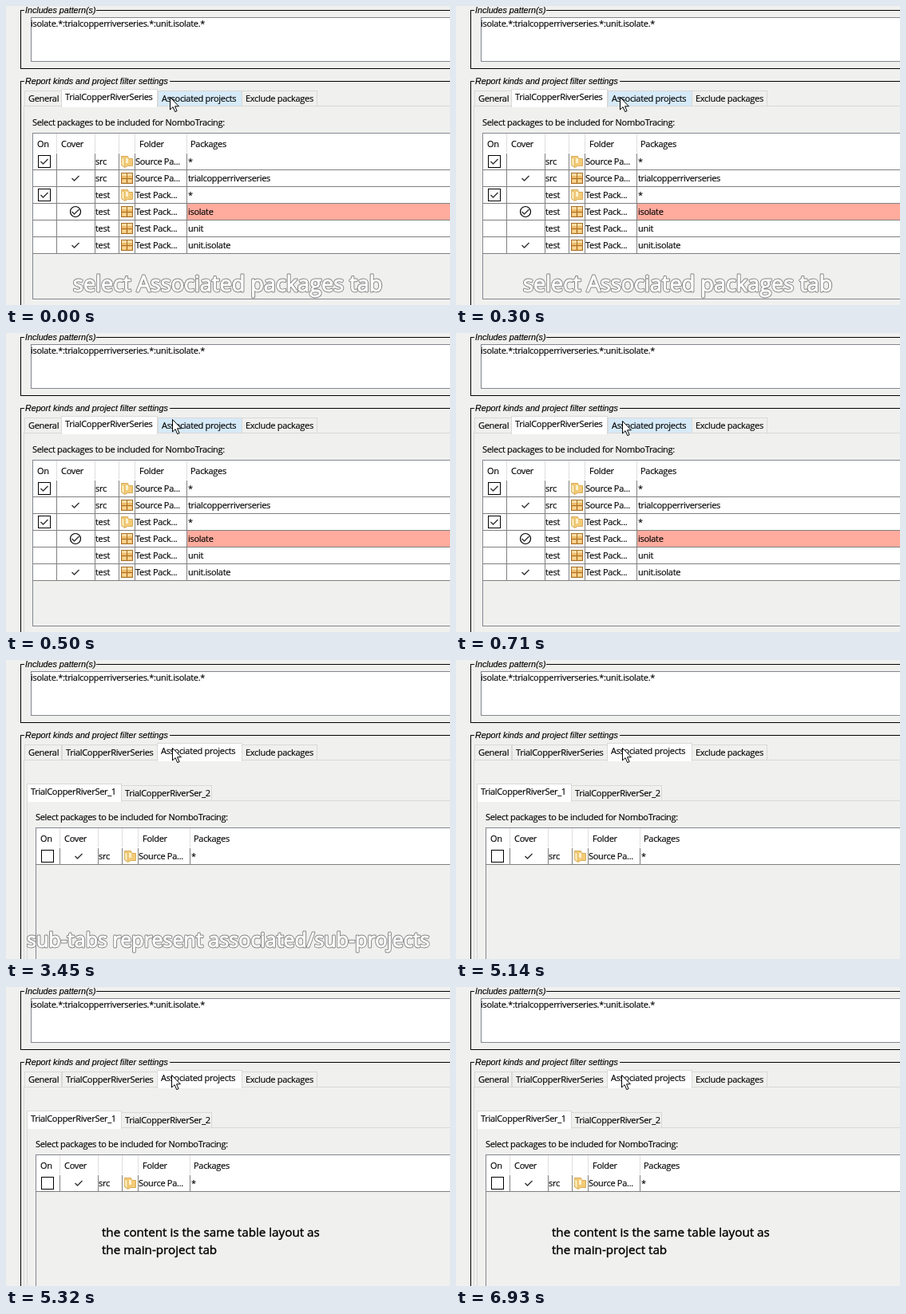
Recreate the animation shown at these times as an HTML page. Size 556x375 px, loop 8 s.

```html
<!DOCTYPE html>
<html lang="en">
<head>
<meta charset="utf-8">
<title>Associated projects tab</title>
<style>
html, body { margin: 0; width: 100%; height: 100%; overflow: hidden; background: #f0f0ee; }
svg { display: block; }
text { font: 11px "Open Sans", "Noto Sans", sans-serif; letter-spacing: -.3px; fill: #000;
  stroke: #000; stroke-width: .15px; }
.legend { font: italic 10.7px "Liberation Sans", Arial, sans-serif; letter-spacing: 0; }
.caption, .outline { letter-spacing: 0; fill: #fff; stroke: #fff; stroke-width: .9px; stroke-linejoin: round; }
.outline { stroke: #858585; stroke-width: 2.8px; }
.note { font-size: 15.2px; letter-spacing: 0; stroke-width: .4px; }
</style>
</head>
<body>
<svg id="stage" width="556" height="375" viewBox="0 0 556 375"></svg>
<script>
const BG = '#f0f0ee', EDGE = '#828790', GRID = '#808080', PALE = '#d9d9d9';
const PROJECT = 'TrialCopperRiverSeries', SUB = 'TrialCopperRiverSer_';

const box = (x, y, w, h, fill) =>
  `<rect x="${x}" y="${y}" width="${w}" height="${h}" fill="${fill}"/>`;
const frame = (x, y, w, h, fill, edge) =>
  box(x, y, w, h, edge) + box(x + 1, y + 1, w - 2, h - 2, fill);
const text = (x, y, s, cls = '', size = '') =>
  `<text x="${x}" y="${y}" class="${cls}"${size && ` style="font-size:${size}px"`}>${s}</text>`;
const caption = (x, y, s, size) => text(x, y, s, 'outline', size) + text(x, y, s, 'caption', size);
const path = (d, stroke, width = 1, fill = 'none') =>
  `<path d="${d}" stroke="${stroke}" stroke-width="${width}" fill="${fill}"/>`;
const at = (x, y, s) => `<g transform="translate(${x} ${y})">${s}</g>`;
const group = (id, s) => `<g id="${id}">${s}</g>`;

const tick = (x, y) => path(`M${x - 4.5} ${y}l3 3 6-6`, '#333', 1.4);
const checkbox = (x, y, on) =>
  frame(x, y, 16, 16, '#fff', '#000') + (on ? tick(x + 8, y + 8) : '');

function fieldset(y, h, title, lineStart) {
  return box(18, y, 1, h, '#000') + box(18, y, 5, 1, '#000') +
    box(lineStart, y, 556, 1, '#000') + text(24, y + 4, title, 'legend');
}

function tab(x, y, w, label, selected, fill = BG) {
  return selected
    ? frame(x, y - 2, w, 23, '#fff', PALE) + box(x + 1, y + 18, w - 2, 3, '#fff') + text(x + 5, y + 12, label)
    : frame(x, y, w, 20, fill, PALE) + text(x + 5, y + 14, label);
}

// Panel whose top edge runs under a row of tabs
const panel = (x, y) => box(x, y, 556, 1, PALE) + box(x, y, 1, 375, PALE);

const folderIcon = at(143, 187,
  path('M1.5 1.5h8l1 3h5v9h-6l-4 2-4-3z', '#d9ac57', 1, '#f3cb78') +
  path('M1.5 2.5l4 2v10.5l-4-3z', '#e0b866', 1, '#fbe6b0') +
  box(7, 4, 3, 6, '#fdf0cc'));
const packageIcon = at(144, 187,
  frame(0, 1, 15, 14, '#edbd6c', '#a86f28') + box(1, 2, 13, 3, '#f9dea6') +
  box(7, 1, 1, 14, '#a86f28') + box(0, 8, 15, 1, '#a86f28') +
  box(2, 10, 4, 3, '#f8d797') + box(9, 10, 4, 3, '#f8d797'));

const COLUMNS = [63, 111, 141, 161, 226];

// Row: [on, cover, kind, icon, package]
function row([on, cover, kind, icon, name], i) {
  const marked = cover === 'ring';
  let s = box(34, 185, 522, 20, '#fff') + (marked ? box(227, 185, 329, 20, '#ffab9d') : '') +
    box(33, 205, 523, 1, GRID) + COLUMNS.map(x => box(x, 185, 1, 21, GRID)).join('');
  if (on) s += checkbox(40, 187, on === 'checked');
  if (marked) s += '<circle cx="87" cy="195" r="6.5" fill="#fff" stroke="#000" stroke-width="1.2"/>';
  if (cover) s += tick(87, 195);
  s += text(112, 199, kind) + icon +
    text(162, 199, kind === 'src' ? 'Source Pa...' : 'Test Pack...') + text(228, 199, name);
  return at(0, i * 21, s);
}

function table(rows, height) {
  return text(33, 150, 'Select packages to be included for NomboTracing:') +
    frame(33, 159, 560, height, BG, EDGE) + box(34, 160, 522, 25, '#fff') +
    COLUMNS.map(x => box(x, 160, 1, 24, '#dedede')).join('') +
    text(39, 177, 'On') + text(69, 177, 'Cover') + text(167, 177, 'Folder') + text(231, 177, 'Packages') +
    rows.map(row).join('');
}

const base = box(0, 0, 556, 375, BG) +
  fieldset(5, 74, 'Includes pattern(s)', 113) + box(18, 78, 556, 1, '#000') +
  frame(31, 14, 560, 56, '#fff', EDGE) +
  text(31, 26, `isolate.*:${PROJECT.toLowerCase()}.*:unit.isolate.*`) +
  fieldset(94, 281, 'Report kinds and project filter settings', 205) +
  panel(22, 125) + tab(23, 106, 47, 'General') + tab(295, 106, 95, 'Exclude packages');

const mainTab = tab(190, 106, 106, 'Associated projects', false, '#d6eaf8') +
  tab(69, 106, 121, PROJECT, true) +
  table([
    ['checked', '', 'src', folderIcon, '*'],
    ['', 'tick', 'src', packageIcon, PROJECT.toLowerCase()],
    ['checked', '', 'test', folderIcon, '*'],
    ['', 'ring', 'test', packageIcon, 'isolate'],
    ['', '', 'test', packageIcon, 'unit'],
    ['', 'tick', 'test', packageIcon, 'unit.isolate']
  ], 209);

const subTabs = tab(70, 106, 120, PROJECT) + tab(189, 106, 107, 'Associated projects', true) +
  panel(26, 176) + tab(144, 157, 114, SUB + 2) + tab(26, 157, 119, SUB + 1, true) +
  at(4, 51, table([['empty', 'tick', 'src', folderIcon, '*']], 400));

const captions = [
  caption(84, 358, 'select Associated packages tab', 27.1),
  caption(26, 360, 'sub-tabs represent associated/sub-projects', 25.1),
  text(120, 313, 'the content is the same table layout as', 'note') +
    text(120, 335, 'the main-project tab', 'note')
];

const arrow = path('M.5.5v15.5l3.6-3.4 2.6 6 2.4-1-2.6-5.8h4.9z', '#000', 1, '#fff');

const stage = document.getElementById('stage');
stage.innerHTML = base + group('main', mainTab) + group('sub', subTabs) +
  captions.map((c, i) => group('caption' + i, c)).join('') + group('cursor', arrow);

// Scene: start time, open tab, caption index, cursor tip
const scenes = [
  [0, 'main', 0, 205, 114],
  [500, 'main', -1, 208, 108],
  [710, 'main', -1, 208, 110],
  [910, 'sub', 1, 208, 110],
  [5140, 'sub', -1, 208, 110],
  [5320, 'sub', 2, 207, 110]
];

const show = (id, on) =>
  document.getElementById(id).setAttribute('display', on ? 'inline' : 'none');

function draw() {
  const t = performance.now() % 8000;
  const [, open, current, x, y] = scenes.findLast(s => s[0] <= t);
  show('main', open === 'main');
  show('sub', open === 'sub');
  captions.forEach((_, i) => show('caption' + i, i === current));
  document.getElementById('cursor').setAttribute('transform', `translate(${x} ${y})`);
  requestAnimationFrame(draw);
}
draw();
</script>
</body>
</html>
```
